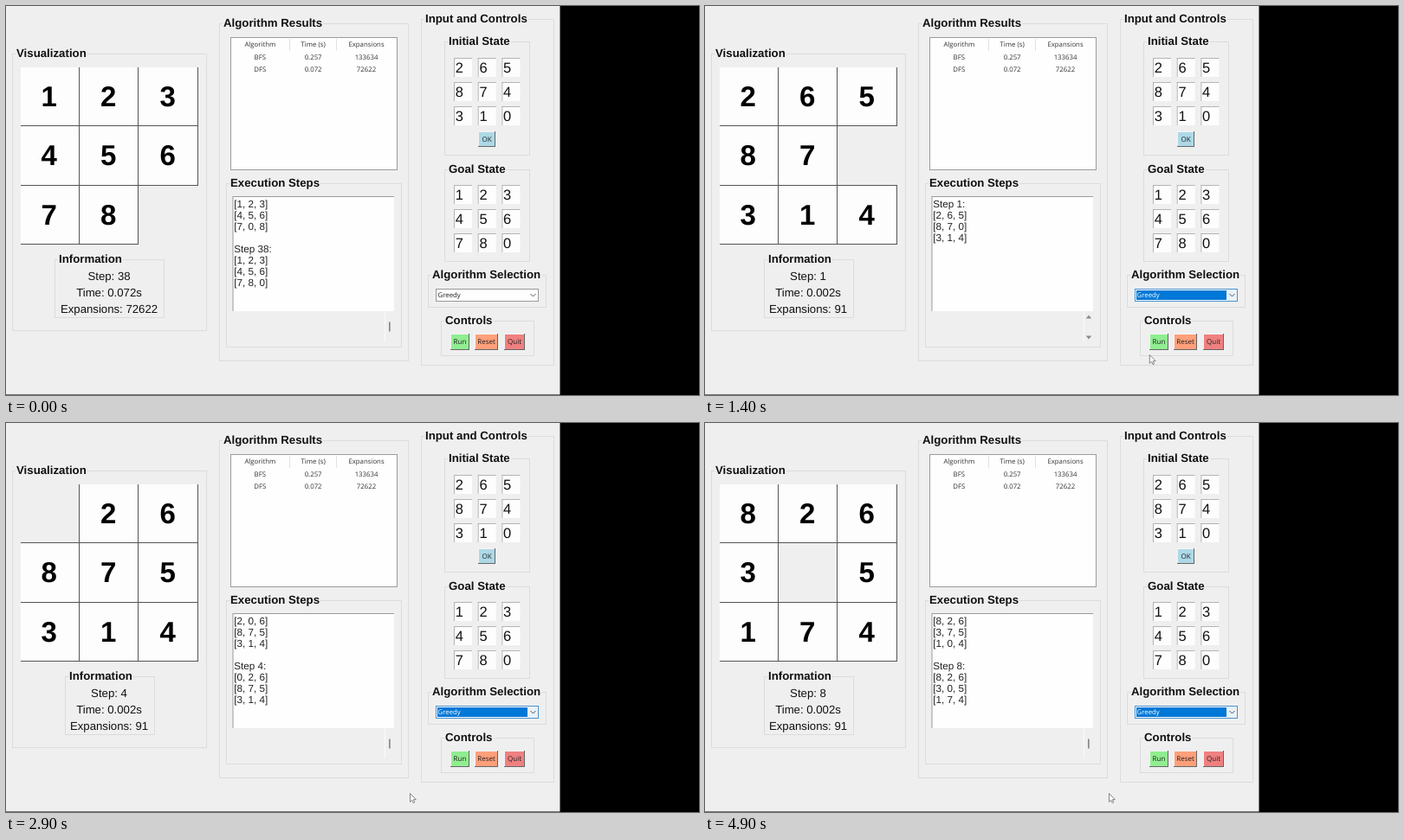
An HTML page with a canvas that plays this animation: 800 px wide and 450 px high, repeating every 5 s.

```html
<!DOCTYPE html>
<html lang="en">
<head>
<meta charset="utf-8">
<title>8-puzzle solver</title>
<style>
html, body { margin: 0; width: 100%; height: 100%; overflow: hidden; background: #000; }
canvas { display: block; }
</style>
</head>
<body>
<canvas id="stage" width="800" height="450"></canvas>
<script>
const ctx = document.getElementById('stage').getContext('2d');
ctx.textRendering = 'geometricPrecision';

const LOOP = 5000, FIRST_STEP = 1100, STEP_TIME = 500;
const BG = '#efeff0', WHITE = '#fdfdfd', INK = '#111', BLUE = '#0078d7';
const SANS = '"Liberation Sans", Arial, sans-serif';
const UI = '"Open Sans", "Noto Sans", sans-serif';

const START = [2, 6, 5, 8, 7, 4, 3, 1, 0];
const GOAL = [1, 2, 3, 4, 5, 6, 7, 8, 0];
const BLANKS = [5, 2, 1, 0, 3, 6, 7, 4];

// Each step slides the tile at the next blank position into the current gap.
const states = BLANKS.reduce((list, next) => {
  const s = list[list.length - 1].slice();
  s[s.indexOf(0)] = s[next];
  s[next] = 0;
  return [...list, s];
}, [START]);

const rows = s => [0, 3, 6].map(i => `[${s.slice(i, i + 3).join(', ')}]`);
const entry = (n, s) => [`Step ${n}:`, ...rows(s), ''];

function fill(x, y, w, h, color) {
  ctx.fillStyle = color;
  ctx.fillRect(x, y, w, h);
}

function frame(x1, y1, x2, y2, color) {
  ctx.strokeStyle = color;
  ctx.lineWidth = 1;
  ctx.strokeRect(x1 + 0.5, y1 + 0.5, x2 - x1 - 1, y2 - y1 - 1);
}

function text(str, x, midY, size, { family = SANS, align = 'left', color = INK, weight = '' } = {}) {
  ctx.font = `${weight} ${size}px ${family}`;
  ctx.textAlign = align;
  ctx.fillStyle = color;
  ctx.fillText(str, x, midY + size * 0.36);
}

const uiText = (str, x, y, color = '#333', align = 'center', size = 7.8) =>
  text(str, x, y, size, { family: UI, align, color });

function group(title, x1, y1, x2, y2) {
  frame(x1, y1, x2, y2, '#dcdcdd');
  ctx.font = `bold 13.25px ${SANS}`;
  fill(x1 + 4, y1 - 7, ctx.measureText(title).width + 2, 15, BG);
  text(title, x1 + 5, y1 - 0.3, 13.25, { weight: 'bold' });
}

function line(points, color, width = 1) {
  ctx.beginPath();
  points.forEach(([x, y]) => ctx.lineTo(x, y));
  ctx.strokeStyle = color;
  ctx.lineWidth = width;
  ctx.stroke();
}

function board(state) {
  const size = 68.4, left = 15.6, top = 70;
  const edgeX = i => Math.round(left + i * size);
  const edgeY = i => Math.round(top + i * size);
  ctx.save();
  ctx.beginPath();
  ctx.rect(17, 71, 206, 206); // hides the outer top and left outline
  ctx.clip();
  state.forEach((n, i) => {
    if (!n) return;
    const col = i % 3, row = Math.floor(i / 3);
    const x1 = edgeX(col), y1 = edgeY(row);
    const x2 = edgeX(col + 1) + 1, y2 = edgeY(row + 1) + 1;
    fill(x1, y1, x2 - x1, y2 - y1, WHITE);
    frame(x1, y1, x2, y2, '#555');
    text(n, left + (col + 0.5) * size, top + (row + 0.5) * size, 33,
      { weight: 'bold', align: 'center', color: '#000' });
  });
  ctx.restore();
}

function info(step, time, count) {
  const half = step > 9 ? 63.5 : 52;
  group('Information', Math.round(119.5 - half), 293, Math.round(119.5 + half), 361);
  [`Step: ${step}`, `Time: ${time}s`, `Expansions: ${count}`].forEach((s, i) =>
    text(s, 119, 312 + i * 19.2, 13.2, { align: 'center' }));
}

function results() {
  group('Algorithm Results', 246, 20, 465, 411);
  fill(259, 36, 193, 154, '#fefefe');
  frame(259, 36, 452, 190, '#999b9e');
  [327, 381].forEach(x => fill(x, 38, 1, 14, '#e2e2e2'));
  const table = [['Algorithm', 'Time (s)', 'Expansions'],
    ['BFS', '0.257', '133634'], ['DFS', '0.072', '72622']];
  table.forEach((cells, r) => cells.forEach((s, c) =>
    uiText(s, [293.3, 354.6, 416][c], [44.3, 59, 73][r])));
}

function log(lines, atTop) {
  group('Execution Steps', 254, 205, 457, 395);
  fill(262, 221, 186, 132, '#fefefe');
  fill(262, 220, 186, 1, '#9a9a9a');
  fill(261.5, 220, 1, 133, '#9a9a9a');
  lines.forEach((s, i) => text(s, 263.2, 228.6 + i * 13.05, 11.7, { color: '#222' }));
  fill(437, 354, 1, 34, '#fafafa');
  if (atTop) {
    ctx.fillStyle = '#8a8a8a';
    [[361.5, -4], [381.5, 4]].forEach(([y, h]) => {
      ctx.beginPath();
      ctx.moveTo(439.8, y);
      ctx.lineTo(446.2, y);
      ctx.lineTo(443, y + h);
      ctx.fill();
    });
  } else {
    fill(442.4, 365.5, 1, 11, '#444');
  }
}

function entries(title, values, top, bottom, first) {
  group(title, 506, top, 605, bottom);
  values.forEach((n, i) => {
    const x = 517 + (i % 3) * 27.7, y = first + Math.floor(i / 3) * 28;
    fill(x, y - 11, 21, 22, WHITE);
    fill(x, y - 11, 21, 1, '#b4b4b4');
    fill(x, y - 11, 1, 22, '#b4b4b4');
    text(n, x + 1.7, y, 16.5);
  });
}

function button(label, x1, y1, x2, y2, color) {
  fill(x1, y1, x2 - x1, y2 - y1, color);
  fill(x1, y1, x2 - x1, 1, '#f4f4f4');
  fill(x1, y1, 1, y2 - y1, '#f4f4f4');
  fill(x1, y2 - 1, x2 - x1, 1, '#666');
  fill(x2 - 1, y1, 1, y2 - y1, '#666');
  uiText(label, (x1 + x2) / 2, (y1 + y2) / 2, '#222', 'center', 8);
}

function controls(focused) {
  group('Input and Controls', 479, 15, 633, 416);
  entries('Initial State', START, 41, 173, 71);
  button('OK', 545, 145, 565, 163, '#add8e6');
  entries('Goal State', GOAL, 189, 296, 218);

  group('Algorithm Selection', 487, 311, 624, 349);
  fill(496, 327, 119, 15, WHITE);
  frame(496, 327, 615, 342, focused ? '#4b93cf' : '#999');
  if (focused) {
    fill(498, 329, 104, 11, BLUE);
    fill(602, 328, 12, 13, '#e9f2f9');
  }
  uiText('Greedy', 498.6, 334.4, focused ? '#fff' : '#222', 'left');
  line([[605.5, 333], [608.5, 336], [611.5, 333]], '#555');

  group('Controls', 502, 364, 610, 405);
  button('Run', 513, 379, 535, 398, '#90ee90');
  button('Reset', 541, 379, 568, 398, '#ffa07a');
  button('Quit', 575, 379, 599, 398, '#f08080');
}

function pointer(t) {
  const path = [[1250, 519, 386], [1400, 513, 403], [1700, 466, 428]];
  let [, x, y] = path[0];
  for (let i = 1; i < path.length; i++) {
    const [t0, x0, y0] = path[i - 1], [t1, x1, y1] = path[i];
    if (t < t0) break;
    const k = Math.min(1, (t - t0) / (t1 - t0));
    x = x0 + (x1 - x0) * k;
    y = y0 + (y1 - y0) * k;
  }
  ctx.beginPath();
  [[0, 0], [0, 9.8], [2.2, 7.8], [3.7, 11], [5.2, 10.3], [3.8, 7.2], [6.8, 7.1]]
    .forEach(([dx, dy]) => ctx.lineTo(x + 0.5 + dx, y + 0.5 + dy));
  ctx.closePath();
  ctx.fillStyle = '#fff';
  ctx.fill();
  ctx.strokeStyle = '#666';
  ctx.lineWidth = 0.8;
  ctx.stroke();
}

function draw(t) {
  const step = t < FIRST_STEP ? 0
    : Math.min(BLANKS.length, 1 + Math.floor((t - FIRST_STEP) / STEP_TIME));
  const solved = step === 0;
  const state = solved ? GOAL : states[step];
  const lines = solved
    ? [...rows([1, 2, 3, 4, 5, 6, 7, 0, 8]), '', ...entry(38, GOAL), '']
    : [...states.slice(1, step + 1).flatMap((s, i) => entry(i + 1, s)), ''];

  fill(0, 0, 800, 450, '#000');
  fill(0, 0, 639.5, 449.5, BG);
  group('Visualization', 7, 55, 232, 376);
  board(state);
  if (solved) info(38, '0.072', 72622);
  else info(step, '0.002', 91);
  results();
  log(lines.slice(-10), step === 1);
  controls(!solved);
  if (!solved) pointer(t);
}

const begin = performance.now();
function tick() {
  draw((performance.now() - begin) % LOOP);
  requestAnimationFrame(tick);
}
tick();
</script>
</body>
</html>
```
